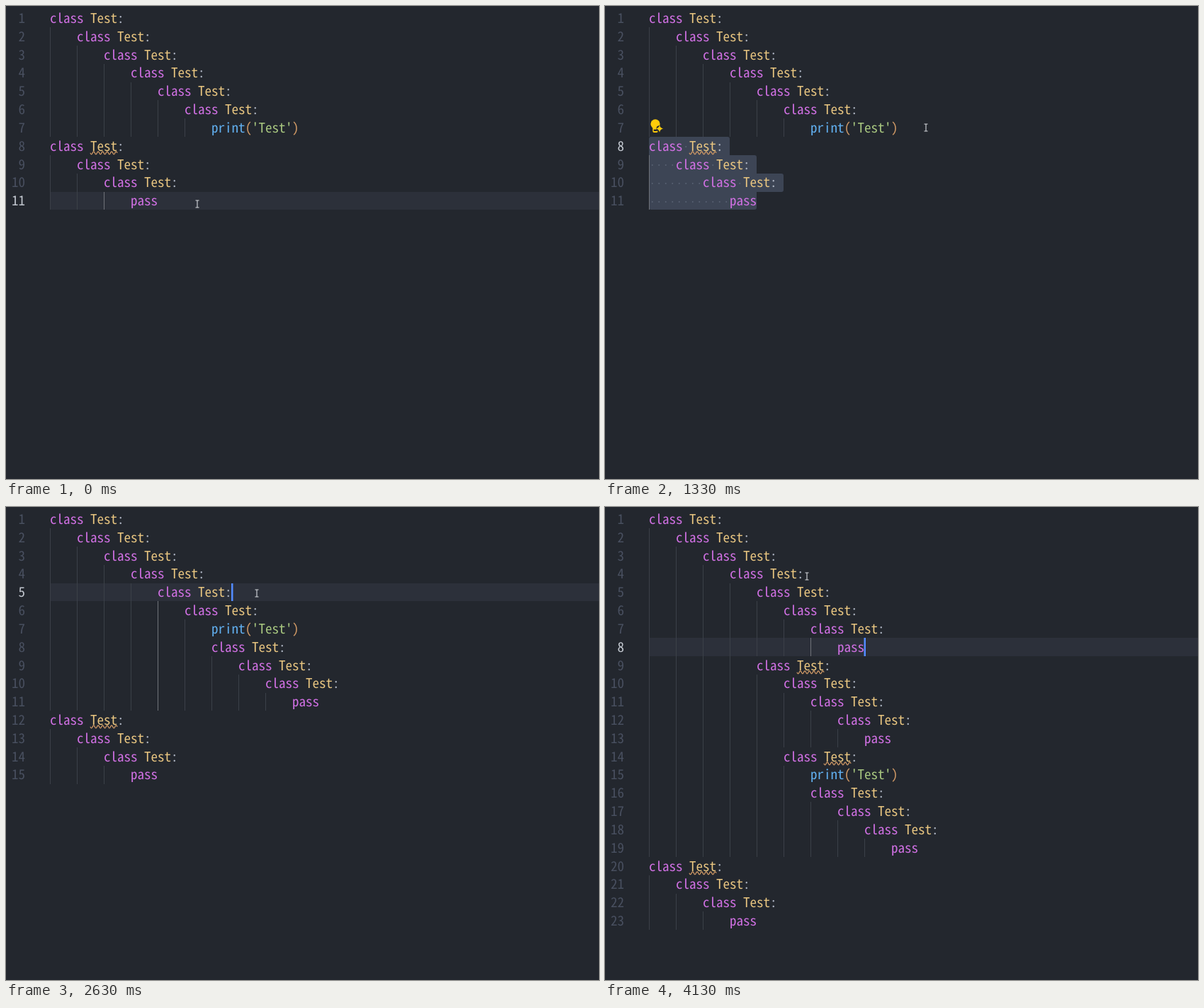
Recreate the animation shown at these times as an HTML page. Size 837 by 669 pixels, loop 4160 ms.

```html
<!DOCTYPE html>
<html lang="en">
<head>
<meta charset="utf-8">
<title>Nested classes</title>
<style>
  html, body { margin: 0; width: 100%; height: 100%; overflow: hidden; background: #23272e; }
  svg { display: block; width: 837px; height: 669px; }
  text { font-family: "Noto Sans Mono CJK JP", "Noto Sans Mono CJK SC", "Noto Sans Mono", monospace; text-rendering: geometricPrecision; }
  .keyword { fill: #d070e3; }
  .type { fill: #e9c681; }
  .call { fill: #61afef; }
  .paren { fill: #d19a66; }
  .string { fill: #a9c880; }
  .punct { fill: #abb2bf; }
  .number { fill: #495060; text-anchor: end; }
  .number.on { fill: #c3c8d0; }
  .band { fill: #2c303a; }
  .selection { fill: #3d4555; }
  .dot { fill: #596274; }
  .guide { fill: #3b4048; }
  .guide.on { fill: #707379; }
  .caret { fill: #528bff; }
  .squiggle { fill: none; stroke: #d19a66; stroke-width: 1.3; }
  .pointer { fill: none; stroke: #d8dade; stroke-width: 1.1; }
  .bulb { fill: #ffcc0a; }
  .gap { fill: #23272e; }
</style>
</head>
<body>
<svg id="stage" viewBox="0 0 837 669"></svg>
<script>
const LOOP = 4160, CELL = 9.5, PITCH = 25.82, LEFT = 62, TOP = 4.3, INDENT = 4;
const stage = document.getElementById('stage');

const TOKENS = {
  class: [['class', 'keyword', 0], ['Test', 'type', 6], [':', 'punct', 10]],
  print: [['print', 'call', 0], ['(', 'paren', 5], ["'Test'", 'string', 6], [')', 'paren', 12]],
  pass: [['pass', 'keyword', 0]],
  blank: []
};
const LENGTH = { class: 11, print: 13, pass: 4, blank: 0 };

const line = (kind, depth) => ({ kind, depth });
const nest = (count, last, depth) => [
  ...Array.from({ length: count }, (_, i) => line('class', depth + i)),
  line(last, depth + count)
];

const DRAG = [30, 530], BULB = 800;
const ACTIONS = [
  [1480, 'click', 6], [1660, 'enter'], [2000, 'paste'],
  [2510, 'click', 4], [2660, 'enter'], [2860, 'paste'],
  [3490, 'click', 3], [3700, 'enter'], [3900, 'paste']
];
const POINTER = [
  [30, 270, 280], [470, 71, 196], [530, 64, 196], [800, 64, 196], [1150, 453, 172],
  [2130, 453, 172], [2480, 354, 122], [3050, 354, 122], [3400, 285, 98]
];

const colX = col => LEFT + col * CELL;
const rowY = row => Math.round(TOP + row * PITCH);
const endCol = l => l.depth * INDENT + LENGTH[l.kind];

function pointerAt(t) {
  const next = POINTER.findIndex(p => p[0] > t);
  if (next === 0) return POINTER[0].slice(1);
  if (next < 0) return POINTER[POINTER.length - 1].slice(1);
  const a = POINTER[next - 1], b = POINTER[next];
  const u = (t - a[0]) / (b[0] - a[0]), e = u * u * (3 - 2 * u);
  return [a[1] + (b[1] - a[1]) * e, a[2] + (b[2] - a[2]) * e];
}

function stateAt(t) {
  const lines = [...nest(6, 'print', 0), ...nest(3, 'pass', 0)];
  let row = 10, col = 16, moved = -600, selected = false, newDepth = 0;

  if (t >= DRAG[0]) {
    moved = Math.min(t, DRAG[1]);
    const [x, y] = pointerAt(moved);
    row = Math.min(10, Math.floor((y - TOP) / PITCH));
    col = Math.max(0, Math.min(endCol(lines[row]), Math.round((x - LEFT) / CELL)));
    selected = row < 10 || col < 16;
  }
  for (const [time, type, target] of ACTIONS) {
    if (time > t) break;
    moved = time;
    selected = false;
    if (type === 'click') {
      row = target;
    } else if (type === 'enter') {
      const from = lines[row];
      newDepth = from.depth + (from.kind === 'class' ? 1 : 0);
      row++;
      // an empty line takes its guides from the line below
      lines.splice(row, 0, line('blank', lines[row].depth));
    } else {
      lines.splice(row, 1, ...nest(3, 'pass', newDepth));
      row += 3;
    }
    col = type === 'enter' ? newDepth * INDENT : endCol(lines[row]);
  }
  return { lines, row, col, selected, caretOn: (t - moved) % 1000 < 500 };
}

const rect = (cls, x, y, w, h) => `<rect class="${cls}" x="${x}" y="${y}" width="${w}" height="${h}"/>`;
const path = (cls, d) => `<path class="${cls}" d="${d}"/>`;
const text = (cls, x, row, str) =>
  `<text class="${cls}" x="${x}" y="${(TOP + row * PITCH + 19.6).toFixed(1)}">${str}</text>`;

function drawSelection({ lines, row, col }) {
  const spans = [];
  for (let r = row; r <= 10; r++) {
    spans.push({ r, from: r === row ? col : 0, to: endCol(lines[r]) + (r < 10 ? 1 : 0) });
  }
  return spans.map((s, i) => {
    const prev = spans[i - 1], next = spans[i + 1];
    const x0 = colX(s.from), x1 = colX(s.to), y0 = rowY(s.r), y1 = rowY(s.r + 1);
    const tl = !prev || prev.from > s.from ? 3 : 0;
    const tr = !prev || prev.to < s.to ? 3 : 0;
    const br = !next || next.to < s.to ? 3 : 0;
    const bl = next ? 0 : 3;
    let out = path('selection', `M${x0 + tl} ${y0}H${x1 - tr}q${tr} 0 ${tr} ${tr}V${y1 - br}q0 ${br} ${-br} ${br}` +
      `H${x0 + bl}q${-bl} 0 ${-bl} ${-bl}V${y0 + tl}q0 ${-tl} ${tl} ${-tl}z`);
    const indent = lines[s.r].depth * INDENT;
    for (let c = s.from; c < s.to; c++) {
      const space = c < indent || (lines[s.r].kind === 'class' && c === indent + 5);
      if (space) out += `<circle class="dot" cx="${colX(c) + CELL / 2}" cy="${y0 + 14}" r="1"/>`;
    }
    return out;
  }).join('');
}

// the guide of the block around the caret, or of the block it opens
function activeGuide(lines, row) {
  const opens = lines[row + 1] && lines[row + 1].depth > lines[row].depth;
  const depth = lines[row].depth + (opens ? 1 : 0);
  let first = opens ? row + 1 : row, last = first;
  while (first > 0 && lines[first - 1].depth >= depth) first--;
  while (last + 1 < lines.length && lines[last + 1].depth >= depth) last++;
  return { level: depth - 1, first, last };
}

function repeatsSibling(lines, row) {
  const { kind, depth } = lines[row];
  if (kind !== 'class') return false;
  for (let r = row - 1; r >= 0 && lines[r].depth >= depth; r--) {
    if (lines[r].depth === depth && lines[r].kind === 'class') return true;
  }
  return false;
}

function drawBulb() {
  return '<circle class="bulb" cx="71" cy="166.8" r="6.6"/>' +
    path('bulb', 'M67.3 171h7.4v6q0 2-2 2h-3.4q-2 0-2-2z') +
    rect('gap', 68.8, 174.6, 4.4, 2.4) +
    '<circle class="gap" cx="77" cy="173.5" r="4.6"/>' +
    path('bulb', 'M77 168.3q.8 4.4 5.2 5.2q-4.4 .8-5.2 5.2q-.8-4.4-5.2-5.2q4.4-.8 5.2-5.2z');
}

function draw(t) {
  const state = stateAt(t), { lines, row, col, selected } = state;
  const active = activeGuide(lines, row);
  let out = selected ? drawSelection(state) : rect('band', LEFT, rowY(row), 775, rowY(row + 1) - rowY(row));

  lines.forEach((l, r) => {
    const y = rowY(r), h = rowY(r + 1) - y, start = l.depth * INDENT;
    for (let k = 0; k < l.depth; k++) {
      const on = k === active.level && r >= active.first && r <= active.last;
      if (selected && r >= row && !on) continue;
      out += rect(on ? 'guide on' : 'guide', colX(k * INDENT), y, 1, h);
    }
    out += text(r === row ? 'number on' : 'number', 27, r, r + 1);
    for (const [str, cls, at] of TOKENS[l.kind]) out += text(cls, colX(start + at), r, str);
    if (repeatsSibling(lines, r)) {
      out += path('squiggle', `M${colX(start + 6)} ${y + 22.8}q1.58 4 3.17 0` + 't3.17 0'.repeat(11));
    }
  });

  if (selected && t >= BULB) out += drawBulb();
  if (state.caretOn) out += rect('caret', colX(col) - (col ? 0.5 : 0), rowY(row), 2.5, rowY(row + 1) - rowY(row));
  const [x, y] = pointerAt(t);
  out += path('pointer', `M${x - 2.5} ${y - 5}h5m-2.5 0v10m-2.5 0h5`);
  return out;
}

// size the font so that one character fills one cell
const probe = document.createElement('canvas').getContext('2d');
probe.font = '100px "Noto Sans Mono CJK JP", "Noto Sans Mono CJK SC", "Noto Sans Mono", monospace';
stage.style.fontSize = CELL * 100 / probe.measureText('M').width + 'px';

let shown = '';
const began = performance.now();
function tick() {
  const picture = draw((performance.now() - began) % LOOP);
  if (picture !== shown) stage.innerHTML = shown = picture;
  requestAnimationFrame(tick);
}
tick();
</script>
</body>
</html>
```
